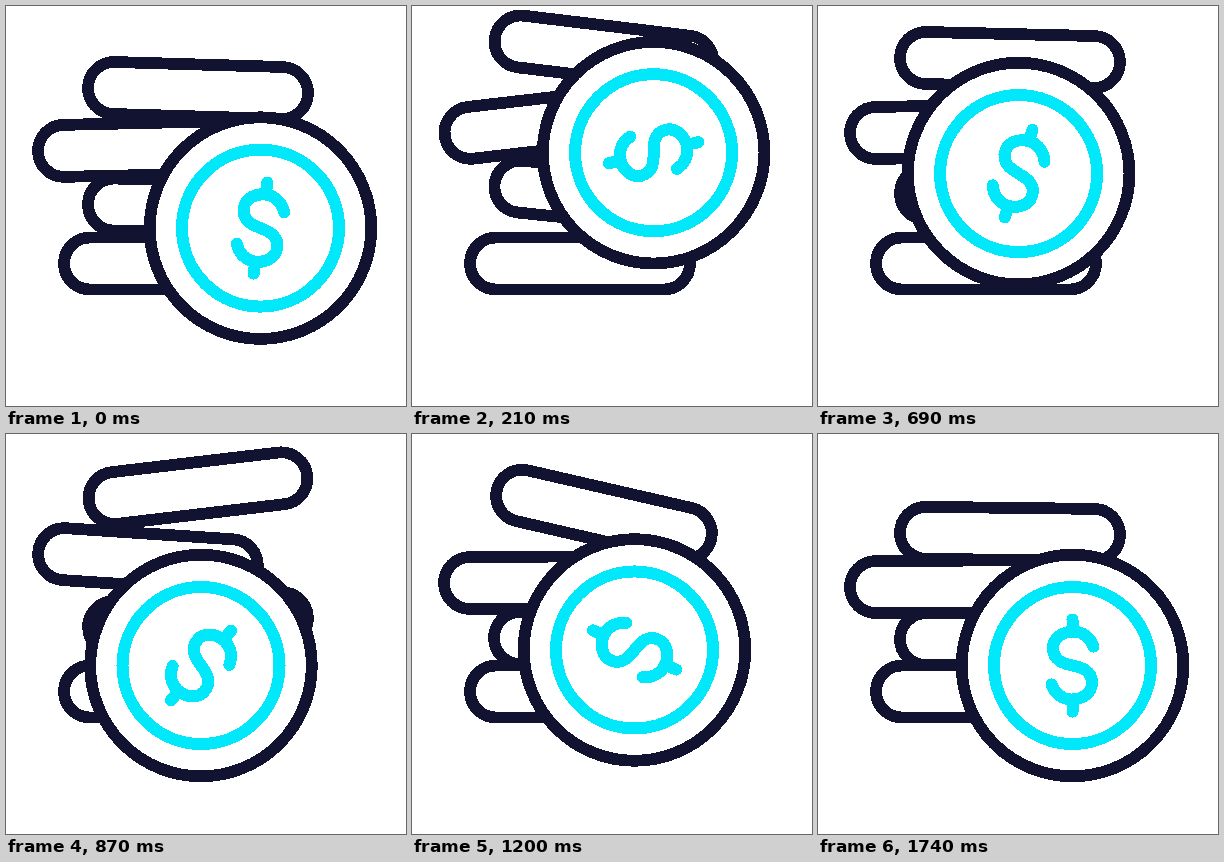
These frames come from a looping animation (400x400 px, 1770 ms). An HTML page:

```html
<!DOCTYPE html>
<html lang="en">
<head>
<meta charset="utf-8">
<title>Bouncing coin</title>
<style>
  html, body { margin: 0; width: 100%; height: 100%; overflow: hidden; background: #fff; }
  svg { display: block; width: 100vw; height: 100vh; shape-rendering: crispEdges; }
  .ink { fill: none; stroke: #121331; stroke-width: 11.8; }
  .glow { fill: none; stroke: #00e8f9; stroke-width: 12; stroke-linecap: round; stroke-linejoin: round; }
</style>
</head>
<body>
<svg viewBox="0 0 400 400">
  <defs><rect id="bar" x="-110" y="-26" width="220" height="52" rx="26"/></defs>
  <g class="ink">
    <use href="#bar" transform="translate(168 257.5)"/>
    <use href="#bar" id="low"/>
    <use href="#bar" id="mid"/>
    <use href="#bar" id="top"/>
  </g>
  <g id="coin">
    <circle class="ink" r="110.8" style="fill:#fff"/>
    <circle class="glow" r="78.5"/>
    <path class="glow" id="dollar" d="M21-19C18-28 10-34 1-34C-10-34-19.5-27-19.5-17.5C-19.5-5-9-2 0 0C9 2 19.5 5 19.5 17.5C19.5 27 10 34-1 34C-10 34-18 28-21 19M0-34V-46M0 34V46"/>
  </g>
</svg>
<script>
const LOOP = 1770, STEP = 30, TURN = 870;
const $ = id => document.getElementById(id);
const place = (id, x, y, a) => $(id).setAttribute('transform', `translate(${x} ${y}) rotate(${a})`);

// Progress from 0 to 1 between two times
const part = (t, from, to) => Math.min(1, Math.max(0, (t - from) / (to - from)));
const easeOut = (u, power) => 1 - (1 - u) ** power;
// Rises from 0 to 1 and falls back; a higher power holds the top longer
const hop = (t, from, to, power = 2.2) => 1 - Math.abs(2 * part(t, from, to) - 1) ** power;

// Each bar is thrown up, leans one way, then the other, and rebounds once.
const bars = [
  { id: 'top', x: 192, rest: 101.5, lift: 47.5, land: 1260, kick: 11, kickEnd: 450,
    rebound: 15, skew: 0.7, lean: 6.3, back: -7.4, tip: 12.3 },
  { id: 'mid', x: 142, rest: 153.5, lift: 28, land: 1220, kick: 10, kickEnd: 560,
    rebound: 8, skew: -0.3, lean: -6.4, back: 4.1, tip: 0 },
  { id: 'low', x: 192, rest: 205.5, lift: 17, land: 1210, kick: 0, kickEnd: 450,
    rebound: 3, skew: 0, lean: 6, back: -3, tip: 0 }
];

function drawBar(b, t) {
  const rise = b.lift * hop(t, -40, b.land, 6) + b.kick * hop(t, -20, b.kickEnd)
    + b.rebound * hop(t, 1360, 1750);
  const tilt = b.skew + b.lean * hop(t, -15, 700, 4) + b.back * hop(t, 700, 1040)
    + b.tip * hop(t, 1040, 1330);
  place(b.id, b.x, b.rest - rise, tilt);
}

function drawCoin(t) {
  const out = part(t, 0, 800), home = part(t, TURN, 1740);
  const glide = (out + out * out * (3 - 2 * out)) / 2;
  const x = 254.5 - 59.5 * (glide - easeOut(home, 1.3));
  const y = 231.5 - 104.5 * hop(t, -18, 840) - 16 * hop(t, TURN, 1420) - 6 * hop(t, 1420, 1740);
  const spin = 221 * easeOut(part(t, -25, TURN), 1.4) + 139 * easeOut(home, 1.6);
  place('coin', x, y, 0);
  place('dollar', 0, 0, spin);
}

function draw(t) {
  bars.forEach(b => drawBar(b, t));
  drawCoin(t);
}

let start;
function tick(now) {
  start ??= now;
  draw(Math.floor((now - start) % LOOP / STEP) * STEP);
  requestAnimationFrame(tick);
}
draw(0);
requestAnimationFrame(tick);
</script>
</body>
</html>
```
